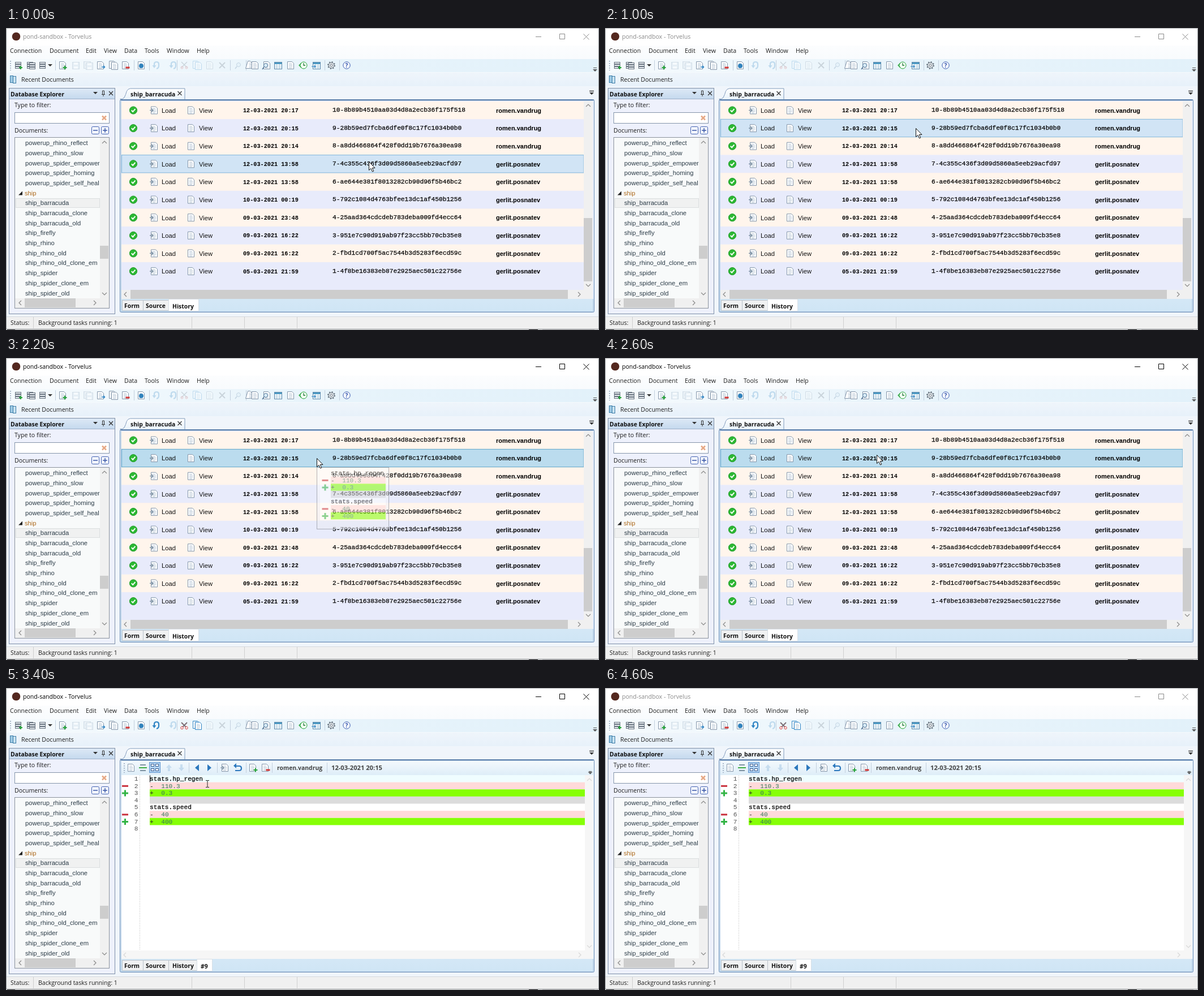
Animation, 1048 px wide and 534 px high, one loop 4.8 s. Source, as an HTML page:

```html
<!DOCTYPE html>
<html lang="en">
<head>
<meta charset="utf-8">
<title>Document history</title>
<style>
html, body { margin: 0; width: 100%; height: 100%; overflow: hidden; background: #fff; }
svg { display: block; width: 100%; height: 100%; }
text { white-space: pre; }
.ui { font: 10.55px "Open Sans", sans-serif; }
.bold { font: bold 10.4px "Open Sans", sans-serif; }
.item { font: 11.2px "Liberation Sans", sans-serif; }
.user { font: bold 11px "Liberation Sans", sans-serif; }
.date { font: bold 10.2px "Liberation Mono", monospace; }
.mono { font: 11.2px "Liberation Mono", monospace; }
.hash { stroke: #000; stroke-width: .25px; }
</style>
</head>
<body>
<svg id="stage" viewBox="0 0 1048 534" xmlns="http://www.w3.org/2000/svg"></svg>
<script>
const LOOP = 4800;
const rect = (x, y, w, h, fill, more = '') =>
  `<rect x="${x}" y="${y}" width="${w}" height="${h}" fill="${fill}" ${more}/>`;
const box = (x, y, w, h, fill, stroke, r = 0) =>
  rect(x + .5, y + .5, w - 1, h - 1, fill, `stroke="${stroke}" rx="${r}"`);
const path = (d, stroke, width = 1, fill = 'none') =>
  `<path d="${d}" stroke="${stroke}" stroke-width="${width}" fill="${fill}"/>`;
const circle = (x, y, r, fill, stroke = 'none') =>
  `<circle cx="${x}" cy="${y}" r="${r}" fill="${fill}" stroke="${stroke}"/>`;
const text = (x, y, str, cls = 'ui', fill = '#1e1e1e', more = '') =>
  `<text x="${x}" y="${y}" class="${cls}" fill="${fill}" ${more}>${str}</text>`;
const group = (id, body, more = '') => `<g id="${id}" ${more}>${body}</g>`;
const faint = (body, opacity = .25) => `<g opacity="${opacity}">${body}</g>`;
const gradient = (id, stops, flat) =>
  `<linearGradient id="${id}" x2="${flat ? 1 : 0}" y2="${flat ? 0 : 1}">` +
  stops.map((c, i) => `<stop offset="${i / (stops.length - 1)}" stop-color="${c}"/>`).join('') +
  '</linearGradient>';

// Small icon parts
const cross = (x, y, r, c, w = 1.3) =>
  path(`M${x - r} ${y - r}l${2 * r} ${2 * r}M${x + r} ${y - r}l${-2 * r} ${2 * r}`, c, w);
const plus = (x, y, r, c, w = 2) => path(`M${x - r} ${y}h${2 * r}M${x} ${y - r}v${2 * r}`, c, w);
const minus = (x, y, r, c, w = 2) => path(`M${x - r} ${y}h${2 * r}`, c, w);
const caret = (x, y, c = '#333') => path(`M${x - 4} ${y - 2}h8l-4 4z`, 'none', 0, c);
const sep = (x, y) => path(`M${x + .5} ${y - 9}v18`, '#c3d0de');
const grip = (x, y) => path(`M${x} ${y - 8}v17`, '#7f92a8', 1.6).replace('/>', ' stroke-dasharray="1.6 2.4"/>');
const chevron = (x, y, dx, dy, c = '#8a8a8a') =>
  path(dx ? `M${x - dx * 2} ${y - 4}l${dx * 4} 4l${-dx * 4} 4` : `M${x - 4} ${y - dy * 2}l4 ${dy * 4}l4 ${-dy * 4}`, c, 1.2);
const page = (x, y, badge = '', c = '#8496aa') =>
  path(`M${x - 5.5} ${y - 6.5}h8l3 3v10h-11z`, c, 1, '#fdfeff') +
  path(`M${x - 3} ${y - 3}h5M${x - 3} ${y - .5}h6M${x - 3} ${y + 2}h6M${x - 3} ${y + 4.5}h5`, '#9fb1c4', .8) + badge;
const server = (x, y, badge = '') =>
  [-6, -2, 2].map(d => box(x - 5, y + d, 11, 4, '#e4e9ee', '#68737f')).join('') + badge;
const table = (x, y) => box(x - 7, y - 6, 14, 13, '#fff', '#5c88ab') + rect(x - 6, y - 5, 12, 3, '#4f9bc4') +
  path(`M${x - 2.5} ${y - 2}v8M${x + 2.5} ${y - 2}v8M${x - 6} ${y + 1}h12M${x - 6} ${y + 3.8}h12`, '#9fc3d8', .8);
const lens = (x, y) => circle(x + 1, y - 1, 3.5, '#d9edf8', '#56789a') + path(`M${x - 2} ${y + 2}l-3 4`, '#56789a', 1.6);
const disk = (x, y) => box(x - 6, y - 6, 13, 13, '#c2d2e2', '#7b93ab') + rect(x - 3, y - 5, 7, 4, '#fff') + rect(x - 3, y + 2, 7, 4, '#fff');
const turn = (x, y, flip = 1) =>
  path(`M${x - 4 * flip} ${y + 1}v-3q0 -4 4 -4t4 4v3q0 4 -4 5`.replace(/(v|q|t)/g, ' $1'), '#2f84c4', 2.2) +
  path(`M${x - 7.5 * flip} ${y}h${7 * flip}l${-3.5 * flip} 5z`, 'none', 0, '#2f84c4');
const loadIcon = (x, y) => page(x + 1, y, path(`M${x - 7} ${y}h6m-3 -3l3 3l-3 3`, '#72889c', 1.2));
const check = (x, y) => circle(x, y, 6.6, '#2cb833', '#219a2b') + path(`M${x - 3.2} ${y}l2.4 2.6l4.2 -5`, '#fff', 1.9);

function toolbar(y = 66) {
  const green = '#26a33a', red = '#d23434', blue = '#2f84c4';
  const arrow = path(`M169 ${y + 3}h5m-2 -2.5l2.5 2.5l-2.5 2.5`, blue, 1.5);
  const copy = page(336, y - 1, '', blue) + page(340, y + 1, '', blue);
  const scissors = cross(315, y - 1, 5, '#6c7783', 1.5) + circle(311, y + 4, 2, 'none', red) + circle(319, y + 4, 2, 'none', red);
  const idle = turn(266, y) + scissors + copy;
  const live = turn(266, y) + cross(315, y, 5, '#7a6c74', 1.8) +
    circle(311, y + 4.5, 2.2, '#fff', red) + circle(319, y + 4.5, 2.2, '#fff', red) + copy;
  return grip(8, y) + server(21, y, plus(26, y + 4, 3, green)) + server(42, y) + server(46, y + 1) +
    server(64, y) + caret(78, y) + sep(87, y) +
    page(100, y, plus(104, y + 4, 3.5, green)) + faint(disk(123, y) + disk(143, y - 1) + disk(147, y + 1)) +
    page(167, y, arrow) + page(188, y - 1) + page(192, y + 1) + page(211, y, minus(215, y + 4, 3.5, red, 3)) + sep(226, y) +
    page(239, y, circle(239, y + 1, 4, '#3183bd')) + sep(253, y) + faint(turn(288, y, -1)) + sep(302, y) +
    group('idleIcons', faint(idle)) + group('liveIcons', live) +
    faint(page(360, y) + cross(382, y, 5, '#66717d', 2)) + sep(396, y) + faint(lens(410, y)) + sep(424, y) +
    page(433, y - 1).replace('h8', 'h4') + page(440, y) + page(461, y) + lens(458, y + 1) + table(481, y) + page(503, y) +
    circle(526, y, 6, '#f3fff3', green) + path(`M526 ${y - 4}v4h3`, '#2d7542', 1.3) + chevron(520, y, -1, 0, green) +
    table(549, y) + path(`M540 ${y + 2}h7m-2 -2l2 2l-2 2`, blue, 1.2) + sep(563, y) +
    circle(575, y, 5, '#dfe4e8', '#65717d') + circle(575, y, 2, '#fff', '#65717d') +
    `<circle cx="575" cy="${y}" r="6" fill="none" stroke="#65717d" stroke-width="2" stroke-dasharray="2 2.7"/>` + sep(589, y) +
    circle(602, y, 6.2, '#f8fbff', '#3657ae') + text(602, y + 4, '?', 'bold', '#3657ae', 'text-anchor="middle"') +
    path('M1038 70.5h6', '#555') + caret(1041, 75, '#555');
}

function frame() {
  const menus = { Connection: 7, Document: 77, Edit: 141, View: 173, Data: 209, Tools: 245, Window: 284, Help: 337 };
  return rect(0, 0, 1048, 534, '#f0f5fb') + rect(0, 0, 1048, 31, '#fff') +
    rect(0, 31, 1048, 73, 'url(#bar)') + rect(2, 55, 1044, 23, 'url(#tools)') + rect(0, 79, 1048, 24, 'url(#recent)') +
    circle(18, 15, 7.3, '#54281f') +
    group('title', text(30, 19, 'pond-sandbox - Torvelus', 'ui', 'currentColor') +
      path('M936 15.5h10M978.5 10.5h9v9h-9zM1020.500 10.500l10 10m0 -10l-10 10', 'currentColor')) +
    Object.entries(menus).map(([name, x]) => text(x, 44, name)).join('') + toolbar() +
    box(7, 84, 6, 13, '#9dc9e4', '#3e7ea8') + box(12, 85, 6, 13, '#c8e2f1', '#3e7ea8') + text(27, 95, 'Recent Documents') +
    rect(0, 510, 1048, 22, '#f0f0f0') + path('M0 510.500h1048', '#d5d9de') +
    [48, 328, 421, 514].map(x => path(`M${x}.5 511v20`, '#cfcfcf')).join('') +
    text(8, 525, 'Status:') + text(57, 525, 'Background tasks running: 1') +
    path('M0 532.5h1048M.5 0v533M1047.5 0v533', '#8c8f93') + path('M0 .5h1048', '#a4a6a9') +
    rect(0, 533, 1048, 1, '#e6e6e6') + rect(2, 533, 14, 1, '#555') + rect(924, 533, 16, 1, '#333') + rect(948, 533, 92, 1, '#bbb');
}

function explorer() {
  const items = ['powerup_rhino_reflect', 'powerup_rhino_slow', 'powerup_spider_empower', 'powerup_spider_homing',
    'powerup_spider_self_heal', 'ship', 'ship_barracuda', 'ship_barracuda_clone', 'ship_barracuda_old', 'ship_firefly',
    'ship_rhino', 'ship_rhino_old', 'ship_rhino_old_clone_em', 'ship_spider', 'ship_spider_clone_em', 'ship_spider_old'];
  const list = items.map((s, i) => text(s == 'ship' ? 33 : 34, 207.3 + i * 17.68, s, 'item', s == 'ship' ? '#ad6a1c' : '#2c3c48')).join('');
  return box(5, 106, 188, 400, '#eef1fc', '#7d8ea6') + rect(6, 107, 186, 18, 'url(#head)') + path('M6 125.500h186', '#9db0c8') +
    text(8, 121, 'Database Explorer', 'bold', '#111') + caret(158, 115) +
    path('M169 117.500h6M172 117v4M170.500 117v-6h3v6', '#333') + cross(185.5, 115.5, 3.5, '#333') +
    text(15, 140, 'Type to filter:') + box(15, 149, 168, 20, '#fff', '#8595aa') +
    cross(173.5, 159, 3.5, '#e7a986', 2.6) + text(15, 185, 'Documents:') +
    [151, 168].map(x => box(x, 174, 14, 14, '#f5f8ff', '#405fae', 2) + minus(x + 7, 181, 4, '#2b4aa0', 1.4)).join('') +
    path('M175 177v8', '#2b4aa0', 1.4) +
    box(15, 193, 168, 303, '#f8fafa', '#8a929b') + box(17, 301, 149, 17, '#f0f1f1', '#dcdfe0') +
    `<g clip-path="url(#listClip)">${list}</g>` + path('M22 295.500h7v-7z', 'none', 0, '#222') +
    rect(166, 194, 16, 284, '#f0f0f0') + rect(166, 385, 15, 23, '#cdcdcd') + chevron(174, 202, 0, -1) + chevron(174, 470, 0, 1) +
    rect(16, 478, 166, 17, '#f0f0f0') + rect(33, 478, 90, 16, '#cdcdcd') + chevron(25, 486, -1, 0) + chevron(157, 486, 1, 0);
}

function tabs(selected) {
  const all = [['Form', 205, 37, 209], ['Source', 242, 45, 247], ['History', 287, 53, 294], ['#9', 337, 27, 344]];
  return all.filter(t => t[0] != '#9' || selected == '#9').map(([name, x, w, tx]) => {
    const on = name == selected;
    return box(x, on ? 479 : 481, w + 1, on ? 22 : 19, on ? '#fff' : '#f0f1f2', on ? '#d7dfe6' : '#b9c1c9') +
      text(tx, on ? 495.5 : 495, name, 'bold', '#111');
  }).join('');
}

function panel() {
  return path('M201.5 125.5h4q4 -1 6 -8l2 -6q2 -4 6 -4.500h96.500v19', '#7f9abb', 1, 'url(#tab)') +
    text(220, 121, 'ship_barracuda', 'bold', '#111') + cross(307, 115.5, 3.5, '#333', 1.2) +
    path('M1031 111.500h8', '#333', 1.4) + caret(1035, 116) +
    box(201, 126, 839, 377, 'url(#foot)', '#6f90b8', 2) + path('M202 127.500h837', '#4d719f') +
    box(203, 128, 835, 374, 'none', '#b3cbe4');
}

const rowTop = i => 129.7 + i * 31.62;
const rowBox = (id, i, fill, stroke) => group(id, rect(204.5, rowTop(i), 816.5, 31.4, fill, `stroke="${stroke}"`));

function history() {
  const a = 'romen.vandrug', b = 'gerlit.posnatev';
  const rows = [
    ['12-03-2021 20:17', '8b89b4510aa03d4d8a2ecb36f175f518', a], ['12-03-2021 20:15', '28b59ed7fcba6dfe0f8c17fc1034b0b0', a],
    ['12-03-2021 20:14', 'a8dd466864f428f0dd19b7676a30ea98', a], ['12-03-2021 13:58', '4c355c436f3d09d5860a5eeb29acfd97', b],
    ['12-03-2021 13:58', 'ae644e381f8013282cb90d96f5b46bc2', b], ['10-03-2021 00:19', '792c1084d4763bfee13dc1af450b1256', b],
    ['09-03-2021 23:48', '25aad364cdcdeb783deba009fd4ecc64', b], ['09-03-2021 16:22', '951e7c90d919ab97f23cc5bb70cb35e8', b],
    ['09-03-2021 16:22', 'fbd1cd700f5ac7544b3d5283f6ecd59c', b], ['05-03-2021 21:59', '4f8be16383eb87e2925aec501c22756e', b]];
  const bands = rows.map((_, i) => rect(204, rowTop(i), 817, 31.7, i % 2 ? '#e8ebfb' : '#fff5ec')).join('');
  const cells = rows.map(([date, hash, user], i) => {
    const y = rowTop(i) + 15.8;
    return check(225, y) + loadIcon(261, y) + text(275, y + 4.3, 'Load', 'item', '#111') +
      page(327, y) + text(341, y + 4.3, 'View', 'item', '#111') + text(419, y + 3.6, date, 'date', '#000') +
      text(577, y + 2.7, `${10 - i}-${hash}`, 'mono hash', '#000') + text(866, y + 4.2, user, 'user', '#000');
  }).join('');
  return rect(204, 129, 834, 350, '#e8ebfb') + bands +
    rowBox('hoverLow', 3, '#d1e4f5', '#82b6da') + rowBox('hoverHigh', 1, '#d1e4f5', '#82b6da') +
    rowBox('picked', 1, '#bbdcee', '#5aa3c8') +
    group('button', box(317, 166, 55, 22, '#8dbbe6', '#5d97d0')) + cells +
    rect(1021, 129, 16, 334, '#f0f0f0') + rect(1021, 336, 15, 112, '#cdcdcd') + chevron(1029, 137, 0, -1) + chevron(1029, 455, 0, 1) +
    rect(204, 463, 833, 16, '#f0f0f0') + rect(220, 463, 773, 16, '#cdcdcd') + chevron(211, 471, -1, 0) + chevron(1013, 471, 1, 0) +
    tabs('History');
}

// Changed lines, shared by the editor and the tooltip
function diff(x, iconX, y, right) {
  const lines = ['stats.hp_regen', '-110.3', '+0.3', '', 'stats.speed', '-40', '+400'];
  const tint = { '-': '#ffdada', '+': '#86ff06', '': '#dcdcdc' };
  return lines.map((s, i) => {
    const mid = y + i * 12.63, sign = s.charAt(0);
    if (sign == 's') return text(x, mid + 3.7, s, 'mono hash', '#000');
    const icon = sign == '-' ? minus(iconX, mid + .5, 5.5, '#c9313d', 3) : sign == '+' ? plus(iconX, mid + .5, 5.5, '#32b445', 3) : '';
    return rect(x, mid - 6.2, right - x, 12.63, tint[sign]) + icon +
      (sign && text(x, mid + 3.7, sign, 'mono', '#222') + text(x + 20.2, mid + 3.7, s.slice(1), 'mono', '#34765a'));
  }).join('');
}

function viewer() {
  const y = 141, blue = '#2c78bd', pale = '#d8d8d8';
  const split = minus(242, y, 7, '#3fad47', 2) + minus(242, y - 5, 5, '#5d7286', 1.5) + minus(242, y + 5, 5, '#5d7286', 1.5);
  const up = path(`M288 ${y - 6}l5 6h-3v6h-4v-6h-3z`, 'none', 0, blue);
  const down = path(`M310 ${y + 6}l5 -6h-3v-6h-4v6h-3z`, 'none', 0, blue);
  const bar = rect(204, 129, 834, 25, 'url(#viewBar)') + grip(209, y) + page(221, y) + split +
    box(253, 131, 20, 19, '#b3d4f3', '#5b92cd') +
    [[256, 134], [264, 134], [256, 142], [264, 142]].map(([a, b]) => box(a, b, 6, 5, '#fff', '#395d91')).join('') +
    faint(up + down, .18) + sep(323, y) +
    path(`M341 ${y - 6}v12l-7 -6zM356 ${y - 6}v12l7 -6z`, 'none', 0, blue) + sep(373, y) +
    loadIcon(386, y) + path(`M405 ${y - 3}h7q4 0 4 4t-4 4h-7`, blue, 2.2) + path(`M407 ${y - 8}v9l-5 -4.500z`, 'none', 0, blue) + sep(424, y) +
    page(436, y, plus(441, y + 4, 3.5, '#26a33a')) + page(458, y, minus(463, y + 4, 3.5, '#d23434', 3)) + sep(470, y) +
    text(479, 145, 'romen.vandrug', 'bold', '#444') + sep(567, y) +
    text(575, 145, '12-03-2021 20:15', 'bold', '#444', 'style="font-size:11.2px"') + path('M1030 147.500h5', '#555') + caret(1032.5, 150.5, '#555');
  const numbers = [...'12345678'].map((n, i) => text(233.5, 163.900 + i * 12.63, n, 'mono', '#555', 'text-anchor="end"')).join('');
  return rect(204, 129, 834, 350, '#fff') + bar + rect(254, 154, 769, 12.7, '#effdff') + numbers +
    path('M236.500 155v309', '#b5b5b5').replace('/>', ' stroke-dasharray="1 2"/>') + diff(254, 210.5, 160.2, 1023) +
    rect(1023, 154, 15, 310, '#f6f6f6') + chevron(1031, 162, 0, -1, pale) + chevron(1031, 457, 0, 1, pale) +
    rect(204, 464, 834, 15, '#f6f6f6') + chevron(210, 472, -1, 0, pale) + chevron(1014, 472, 1, 0, pale) +
    group('textCaret', rect(254, 154.500, 1, 12, '#000')) + tabs('#9');
}

const tooltip = () => box(549, 193, 128, 110, 'url(#tip)', '#767b83') + rect(555, 197, 116, 90, '#fff') + diff(574, 564, 203.2, 671);
const pointer = path('M.5 .5v15l3.400 -3.200l2.600 5.700l2.300 -1l-2.500 -5.500h4.700z', '#111', 1, '#fff');
const beam = path('M353 163.500h2.500l.5 .5l.5 -.5h2.500M356 163.500v12M353 175.500h2.500l.5 -.5l.5 .5h2.500', '#222');

document.getElementById('stage').innerHTML = '<defs>' +
  gradient('bar', ['#fcfdfe', '#f1f7fc']) + gradient('tools', ['#f5fafd', '#e8f4fb', '#e2f1fa'], true) +
  gradient('recent', ['#eff5fb', '#e7f1fa']) + gradient('head', ['#dde9f6', '#c5d9ee']) + gradient('tab', ['#fff', '#e9f2fb']) +
  gradient('foot', ['#e9f3fb', '#e9f3fb', '#e9f3fb', '#cfe5f5']) + gradient('viewBar', ['#f3f9fd', '#deedf8']) +
  gradient('tip', ['#fff', '#e9eaf3']) +
  '<clipPath id="listClip"><rect x="16" y="194" width="149.500" height="284"/></clipPath></defs>' +
  frame() + explorer() + panel() + group('history', history()) + group('viewer', viewer()) +
  group('tooltip', tooltip()) + group('pointer', pointer) + group('beam', beam);

// Hard steps: each entry is time in ms and the value held from then on
function steps(id, prop, ...keys) {
  const frames = keys.map(([t, v]) => `${Math.max(0, t - 2) / LOOP * 100}% { ${prop}: ${v} }`).join(' ');
  return `@keyframes ${id}-${prop} { ${frames} 100% { ${prop}: ${keys[keys.length - 1][1]} } }`;
}
const tracks = [
  ['title', 'color', [0, '#8a8a8a'], [2200, '#000'], [4600, '#8a8a8a']],
  ['hoverLow', 'opacity', [0, 1], [200, 0]],
  ['hoverHigh', 'opacity', [0, 0], [200, 1], [2200, 0]],
  ['picked', 'opacity', [0, 0], [2200, 1]],
  ['button', 'opacity', [0, 0], [3000, 1]],
  ['tooltip', 'opacity', [0, 0], [1200, .6], [1400, 1], [2200, .55], [2400, 0]],
  ['history', 'opacity', [0, 1], [3400, 0]],
  ['idleIcons', 'opacity', [0, 1], [3400, 0]],
  ['viewer', 'opacity', [0, 0], [3400, 1]],
  ['liveIcons', 'opacity', [0, 0], [3400, 1]],
  ['textCaret', 'opacity', [0, 1], [4000, 0], [4400, 1], [4600, 0]],
  ['pointer', 'opacity', [0, 1], [3200, 0]],
  ['pointer', 'transform', [0, 'translate(641px, 236px)'], [200, 'translate(549px, 177px)'], [2600, 'translate(480px, 171px)'],
    [2800, 'translate(416px, 167px)'], [3000, 'translate(351px, 167px)']],
  ['beam', 'opacity', [0, 0], [3200, 1], [4400, 0]]
];
const names = {};
for (const [id, prop] of tracks) (names[id] ||= []).push(`${id}-${prop} ${LOOP}ms step-end infinite`);
const sheet = document.createElement('style');
sheet.textContent = tracks.map(t => steps(...t)).join('\n') +
  Object.entries(names).map(([id, list]) => `#${id} { animation: ${list.join(', ')} }`).join('\n');
document.head.append(sheet);
</script>
</body>
</html>
```
